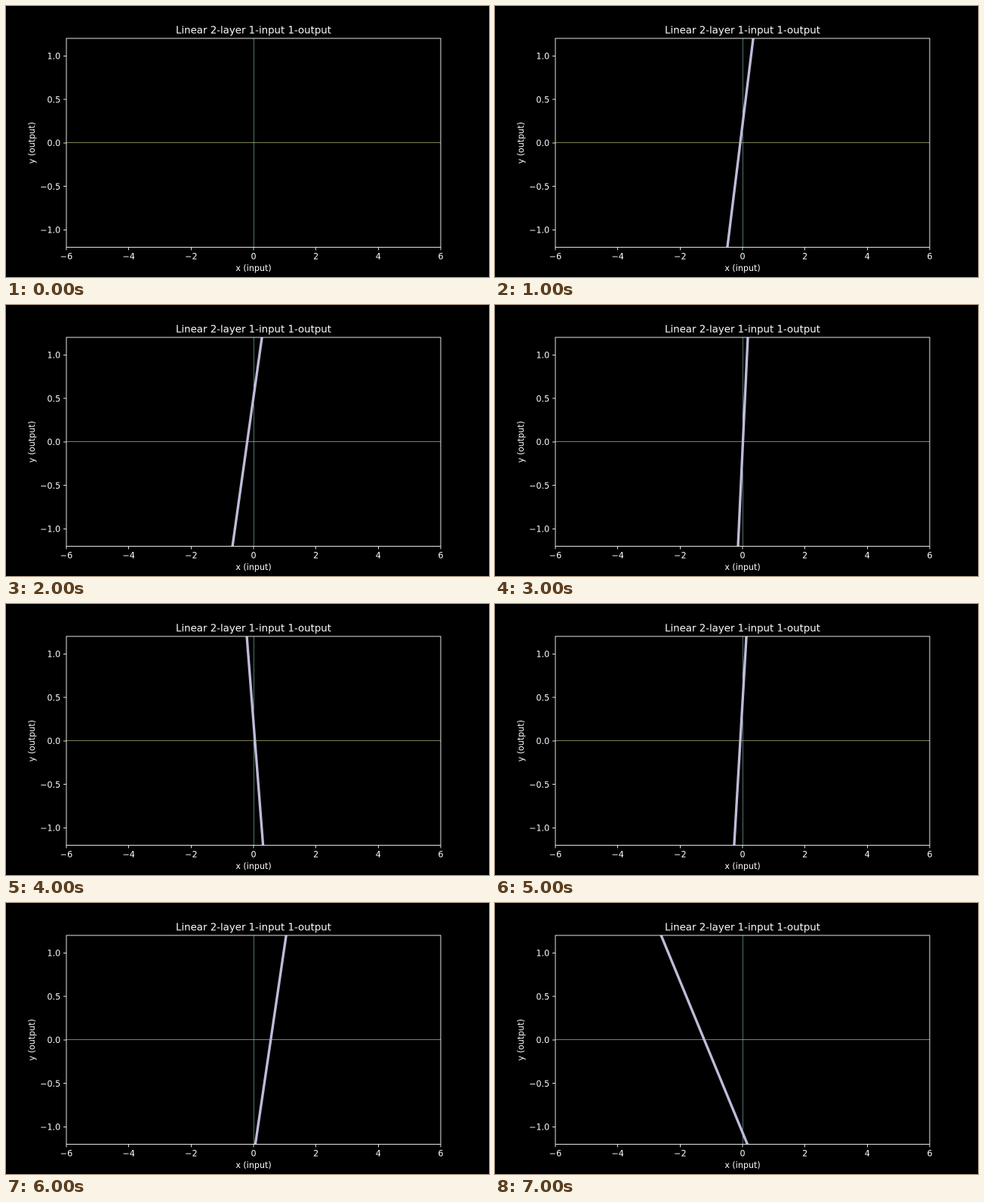
Animation, 640 px wide and 360 px high, one loop 8000 ms. Source, as an HTML page with a canvas:

```html
<!DOCTYPE html>
<html lang="en">
<head>
<meta charset="utf-8">
<title>Linear 2-layer 1-input 1-output</title>
<style>
  html, body { margin: 0; width: 100%; height: 100%; overflow: hidden; background: #000; }
  canvas { display: block; }
</style>
</head>
<body>
<canvas id="stage" width="640" height="360"></canvas>
<script>
// The plot is drawn at double size and scaled down for soft, even edges.
const SCALE = 2;
const stage = document.getElementById('stage').getContext('2d');
const sheet = document.createElement('canvas');
sheet.width = 640 * SCALE;
sheet.height = 360 * SCALE;
const ctx = sheet.getContext('2d');

const PT = 160 / 72; // sheet pixels per point
const box = { left: 160, right: 1152, top: 86.4, bottom: 640.8 };
const STEP = 1000;

// Where each sampled linear function meets the top and bottom of the axes,
// in stage pixels.
const samples = [
  null,
  { top: 342.1, bottom: 307.9 },
  { top: 339.1, bottom: 300.1 },
  { top: 335, bottom: 322 },
  { top: 319.1, bottom: 340.6 },
  { top: 333.1, bottom: 316.9 },
  { top: 371.2, bottom: 330.4 },
  { top: 220.2, bottom: 334.4 }
];

const toCentre = v => Math.floor(v) + 0.5;
const xOf = v => box.left + (v + 6) / 12 * (box.right - box.left);
const yOf = v => box.bottom - (v + 1.2) / 2.4 * (box.bottom - box.top);
const minus = str => str.replace('-', '\u2212');

function line(x1, y1, x2, y2, color, points) {
  ctx.strokeStyle = color;
  ctx.lineWidth = points * PT;
  ctx.beginPath();
  ctx.moveTo(x1, y1);
  ctx.lineTo(x2, y2);
  ctx.stroke();
}

function text(str, x, y, points, align = 'center') {
  ctx.font = `${points * PT}px "DejaVu Sans", sans-serif`;
  ctx.textAlign = align;
  ctx.fillStyle = '#fff';
  ctx.fillText(str, x, Math.round(y));
}

function drawPlot(sample) {
  const { left, right, top, bottom } = box;
  const x0 = toCentre(xOf(0)), y0 = toCentre(yOf(0));
  ctx.save();
  ctx.beginPath();
  ctx.rect(left, Math.round(top), right - left, Math.round(bottom) - Math.round(top));
  ctx.clip();
  line(left, y0, right, y0, '#feffb3', 0.5);
  line(x0, top, x0, bottom, '#8dd3c7', 0.5);
  if (sample) {
    // Extend past both edges so that the clip cuts the ends flat.
    const xTop = sample.top * SCALE, xBottom = sample.bottom * SCALE;
    const dx = (xTop - xBottom) * 0.1, dy = (bottom - top) * 0.1;
    line(xTop + dx, top - dy, xBottom - dx, bottom + dy, '#bfbbd9', 3);
  }
  ctx.restore();
}

function drawAxes() {
  const top = Math.round(box.top), bottom = Math.round(box.bottom);
  const tick = 3.5 * PT;

  ctx.strokeStyle = '#fff';
  ctx.lineWidth = 0.8 * PT;
  ctx.strokeRect(box.left, top, box.right - box.left, bottom - top);

  for (let v = -6; v <= 6; v += 2) {
    const x = Math.round(xOf(v));
    line(x, bottom, x, bottom + tick, '#fff', 0.8);
    text(minus(String(v)), xOf(v), 673, 10);
  }
  for (let v = -1; v <= 1; v += 0.5) {
    const y = Math.round(yOf(v));
    line(box.left, y, box.left - tick, y, '#fff', 0.8);
    text(minus(v.toFixed(1)), box.left - 2 * tick, yOf(v) + 8.5, 10, 'right');
  }

  text('Linear 2-layer 1-input 1-output', xOf(0), 73, 12);
  text('x (input)', xOf(0), 704, 10);
  ctx.save();
  ctx.translate(76, yOf(0));
  ctx.rotate(-Math.PI / 2);
  text('y (output)', 0, 0, 10);
  ctx.restore();
}

function render() {
  const index = Math.floor(performance.now() / STEP) % samples.length;
  ctx.fillStyle = '#000';
  ctx.fillRect(0, 0, sheet.width, sheet.height);
  drawPlot(samples[index]);
  drawAxes();
  stage.drawImage(sheet, 0, 0, 640, 360);
  requestAnimationFrame(render);
}

render();
</script>
</body>
</html>
```
